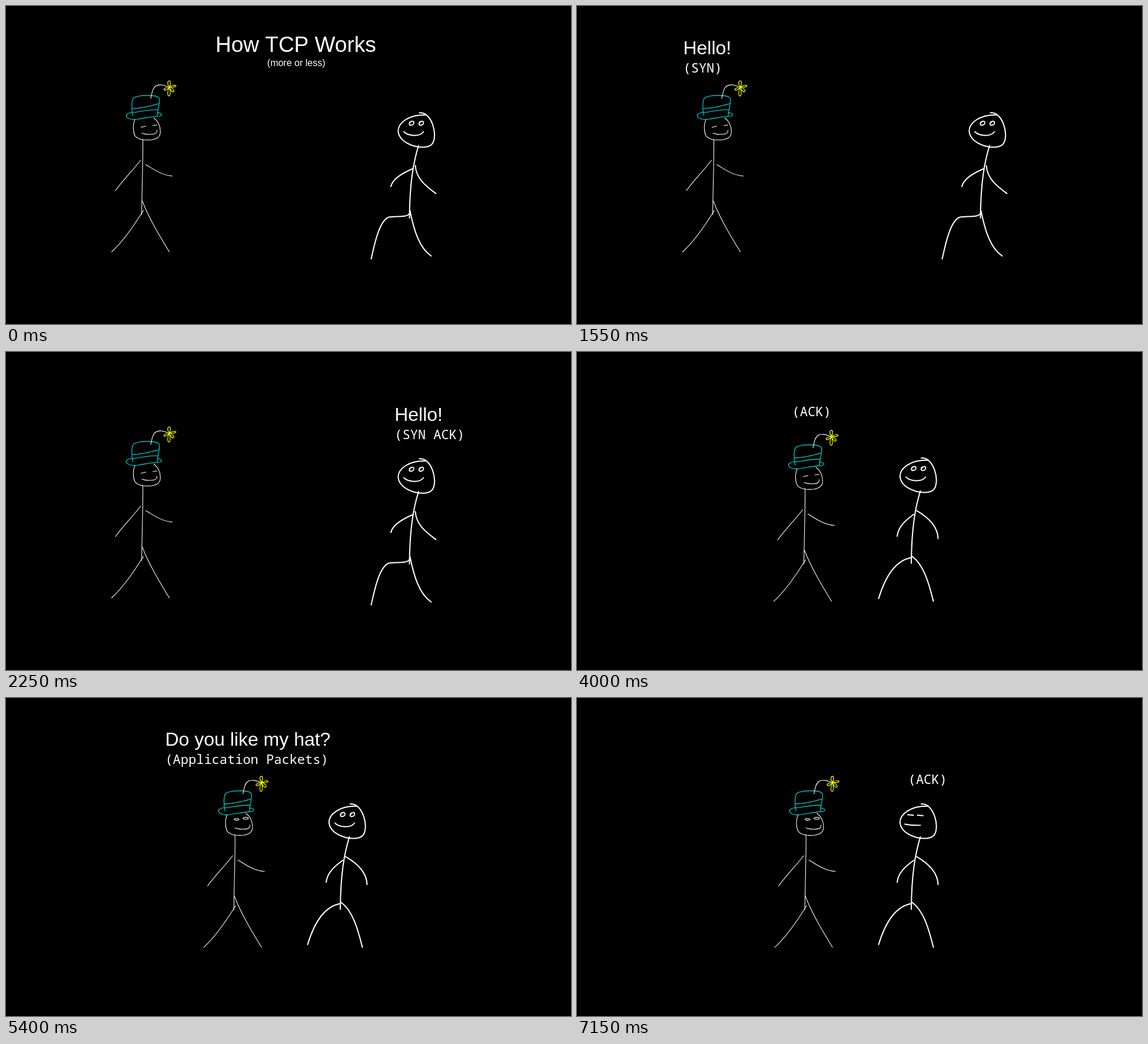
An HTML page with a canvas that plays this animation: 960 px wide and 540 px high, repeating every 8 s.

```html
<!DOCTYPE html>
<html lang="en">
<head>
<meta charset="utf-8">
<title>How TCP Works</title>
<style>
html, body { margin: 0; width: 100%; height: 100%; overflow: hidden; background: #000; }
canvas { display: block; width: 960px; height: 540px; }
</style>
</head>
<body>
<canvas id="stage" width="960" height="540"></canvas>
<script>
const ctx = document.getElementById('stage').getContext('2d');
const WHITE = '#fff', CYAN = '#00e0e0', YELLOW = '#ff0';
const SANS = '"Liberation Sans", Arial, sans-serif';
const MONO = '"Noto Sans Mono", monospace';

const guest = {
  body: `M219 193C215 202 216 214 219 220C224 228 238 228 247 227.3C257 225.5 262.5 222 262.3 213C262 203 258 195 251 190
    M232.5 226C233 260 231 310 230.5 354
    M228.5 262C215 280 198 296 186 313.5
    M237.5 269.5C248 275 262 287 282.5 288.7
    M233.5 347C218 372 200 399 179.5 417.5
    M231.5 331C243 361 262 392 277.5 417.5`,
  mouth: 'M231 215.7C236 218.2 252 219.5 255.5 215Q256.8 213 256.3 211',
  shut: 'M229.5 206L237.5 204M249.5 203L256.5 202',
  open: 'M231 200.3a4.2 1.5 0 1 0 8.4 0a4.2 1.5 0 1 0 -8.4 0M246.2 198.5a4.5 1.7 0 1 0 9 0a4.5 1.7 0 1 0 -9 0',
  hat: `M215.5 186C213 174 213 161 217 156C225 151 255 150 260 156C263 161 258 172 257 186
    M215 174C225 174 245 170 259 166
    M214 181C225 180 240 176 258 176
    M213 180.5C206 182 203 185 205 188C208 193 217 193 225 192C238 190 252 187 261 187C266 186 266 182 257 181`,
  stem: 'M246 157C248 148 249 139 255 135.5C262 132 269 135 275 137',
  flower: `M277.5 137.5C273 132 275 127 277.5 127C280 127 280 132 277.5 137.5
    C283 134 289 134 288.8 136C288 138 283 138 277.5 137.5
    C282 138 287 144 285 145.5C282 147 279 142 277.5 137.5
    C279.5 144 279.5 152.8 277 152.8C274 152.8 274 144 277.5 137.5
    C274 143 269 144 268.2 142C268 140 273 138 277.5 137.5`
};

const host = {
  head: `M702.5 181.3C709 180.5 714 184 717.5 188C724.5 196 728 209 728.2 219C728 235 721.5 239.5 708 239.8C690 239.5 668 230 666.3 213C666 198 685 184 713 185
    M701 237C692 266 686 300 685.5 360`,
  smile: `M676 213.5C682 220 702 223.5 709.3 213.5
    M687 196.5C684 199 685 202.5 688 202.5C692 202.5 694 199 692.5 196.5C691 195 688 195.5 686.5 198
    M703.5 196.5C700.5 199 701.5 202.5 704.5 202.5C708.5 202.5 710.5 199 709 196.5C707.5 195 704.5 195.5 703.5 198`,
  bored: 'M679 199.5L688.5 200.2M695.5 200.2L705 201M674 215.4C682 217 692 217.5 700.5 217.3',
  stride: `M690.5 276.5C672 284.5 656.5 294 654 306.5
    M695.5 271C697 294 714 306 730.5 318.5
    M685.5 352.5C680 360 662 356 650 358.7C634 365 626 405 620.5 429.5
    M686.5 348C693 380 702 411 722.5 424.5`,
  stand: `M689.5 277C674.5 288 663.5 298 661.5 314
    M694.5 270.5C714.5 282 730.5 298 731 318
    M684.5 350.5C657.5 356 640.5 385 630 420
    M686.5 348C706.5 362 715.5 394 723 424.5`
};

for (const part of [guest, host])
  for (const key in part) part[key] = new Path2D(part[key]);

const big = (s, x, y) => [s, x, y, '32px ' + SANS];
const code = (s, x, y) => [s, x, y, '22px ' + MONO];

const scenes = [
  { end: 500, text: [['How TCP Works', 356, 78, '37px ' + SANS], ['(more or less)', 443.8, 102, '16px ' + SANS]] },
  { end: 2250, text: [big('Hello!', 180.4, 82), code('(SYN)', 180.5, 113)] },
  { end: 4000, text: [big('Hello!', 660.2, 116.5), code('(SYN ACK)', 660.3, 148)] },
  { end: 5400, near: true, dx: 155, text: [code('(ACK)', 365.6, 109)] },
  { end: 7150, near: true, dx: 156.6, open: true, text: [big('Do you like my hat?', 270.4, 81), code('(Application Packets)', 270.4, 112)] },
  { end: 8000, near: true, dx: 156.6, open: true, bored: true, text: [code('(ACK)', 562.7, 146)] }
];

function stroke(path, color, width, dx = 0, dy = 0) {
  ctx.save();
  ctx.translate(dx, dy);
  ctx.strokeStyle = color;
  ctx.lineWidth = width;
  ctx.stroke(path);
  ctx.restore();
}

function drawGuest({ near, dx = 0, open }) {
  const dy = near ? 5.8 : 0;
  stroke(guest.body, WHITE, 1.05, dx, dy);
  stroke(guest.mouth, WHITE, 1.1, dx + (open ? 1.5 : 0), dy - (open ? 1 : 0));
  stroke(open ? guest.open : guest.shut, WHITE, 1.1, dx, dy);
  stroke(guest.hat, CYAN, 1.15, dx, dy);
  stroke(guest.stem, WHITE, 1.1, dx, dy);
  stroke(guest.flower, YELLOW, 1.2, dx, dy);
}

function drawHost({ near, bored }) {
  const dx = near ? -117.5 : 0, dy = near ? -1.2 : 0;
  stroke(host.head, WHITE, 2, dx, dy);
  stroke(bored ? host.bored : host.smile, WHITE, 1.9, dx + (near ? 0.5 : 0), dy);
  stroke(near ? host.stand : host.stride, WHITE, 2, dx, dy);
}

function frame(now) {
  const t = now % 8000;
  const scene = scenes.find(s => t < s.end);
  ctx.fillStyle = '#000';
  ctx.fillRect(0, 0, 960, 540);
  ctx.lineCap = ctx.lineJoin = 'round';
  drawGuest(scene);
  drawHost(scene);
  ctx.fillStyle = WHITE;
  for (const [s, x, y, font] of scene.text) {
    ctx.font = font;
    ctx.fillText(s, x, y);
  }
}

const start = performance.now();
function tick() {
  frame(performance.now() - start);
  requestAnimationFrame(tick);
}
tick();
</script>
</body>
</html>
```
